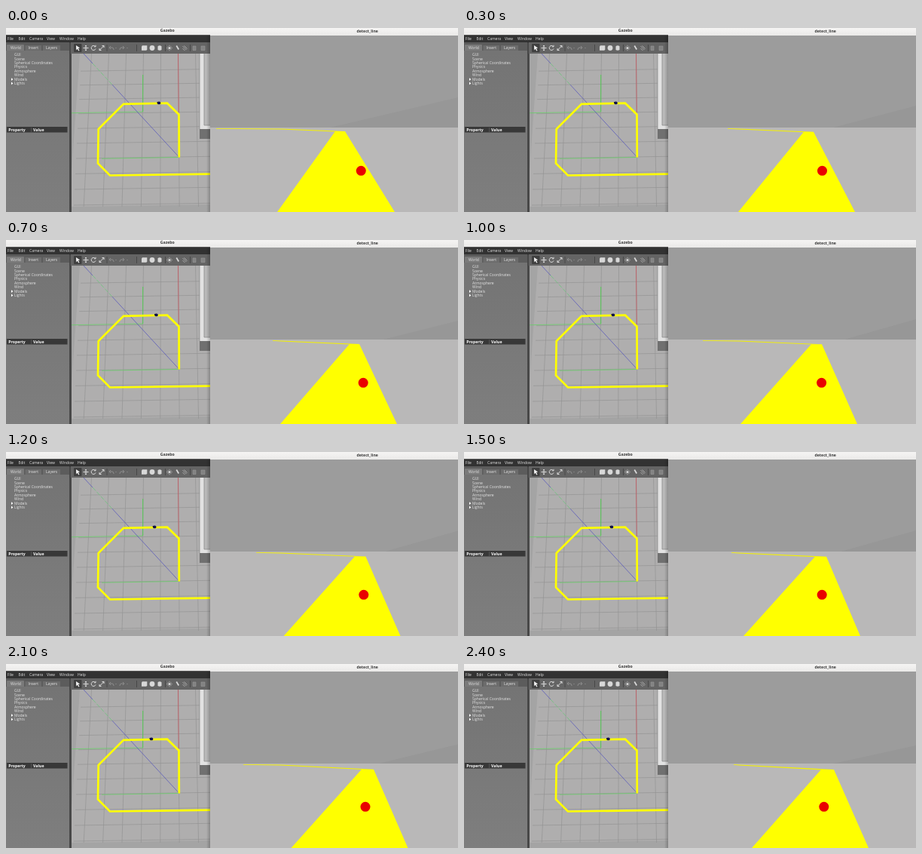
An HTML page that plays this animation: 600 by 244 pixels, repeating every 2500 ms.

```html
<!DOCTYPE html>
<html lang="en">
<head>
<meta charset="utf-8">
<title>Line follower</title>
<style>
  html, body { margin: 0; width: 100%; height: 100%; overflow: hidden; background: #777; }
  svg { display: block; width: 600px; height: 244px; }
  text { font-family: "Open Sans", "Noto Sans", sans-serif; font-size: 5px; fill: #e4e4e4; }
  .title { font-weight: 700; font-size: 5.2px; fill: #3a3a3a; text-anchor: middle; }
  .menu { font-size: 5.4px; fill: #f2f2f2; }
  .head { font-weight: 700; font-size: 5.2px; fill: #fff; }
  .stroke { fill: none; }
</style>
</head>
<body>
<svg viewBox="0 0 600 244">
  <defs>
    <linearGradient id="bar" x2="0" y2="1">
      <stop stop-color="#f5f4f3"/><stop offset="1" stop-color="#eae9e8"/>
    </linearGradient>
    <linearGradient id="side" x2="0" y2="1">
      <stop stop-color="#747474"/><stop offset="1" stop-color="#7e7e7e"/>
    </linearGradient>
    <linearGradient id="shadow">
      <stop stop-opacity="0"/><stop offset="1" stop-opacity=".22"/>
    </linearGradient>
    <clipPath id="view"><rect x="87" y="34" width="184" height="210"/></clipPath>
    <clipPath id="camera"><rect x="271" y="10" width="329" height="234"/></clipPath>
  </defs>

  <!-- simulator window -->
  <rect width="271" height="10" fill="url(#bar)"/>
  <text class="title" x="214.300" y="5.200">Gazebo</text>
  <rect y="9.400" width="271" height="235" fill="#484848"/>
  <rect y="9.400" width="271" height="10" fill="#323232"/>
  <g id="menu" class="menu"></g>
  <rect y="19" width="84" height="12" fill="#5c5c5c"/>
  <path d="M1 31V23q0-1 1-1H23q1 0 1 1V31z" fill="#7a7a7a"/>
  <path d="M25.500 30V23H47V30zM49 30V23H72V30z" fill="#6c6c6c"/>
  <g id="tabs"></g>
  <rect y="30" width="84" height="214" fill="url(#side)"/>
  <g id="tree"></g>
  <path d="M7 66.200l2.400 1.900-2.400 1.900zM7 71.500l2.400 1.900-2.400 1.900z" fill="#fff"/>
  <rect x="1" y="131" width="80.500" height="7.500" fill="#383838"/>
  <text class="head" x="3.200" y="136.500">Property</text>
  <text class="head" x="36" y="136.500">Value</text>
  <path d="M33.500 132V138" stroke="#666" stroke-width=".6"/>

  <!-- toolbar -->
  <rect x="86" y="19" width="185" height="15" fill="#646464"/>
  <rect x="90" y="21" width="10.500" height="11" rx="1" fill="#404040"/>
  <path d="M93 23l5.200 3.500-2.300.6 1.600 2.700-1.200.7-1.500-2.800-1.700 1.600z" fill="#eee"/>
  <g class="stroke" stroke="#ddd" stroke-width="1">
    <path d="M102.500 26.500h7M106 23v7M104.900 24.200l1.100-1.200 1.100 1.200M104.900 28.800l1.100 1.200 1.100-1.200"/>
    <path d="M118.500 24.500a3 3 0 1 0 .5 3M119 22.800v2h-2"/>
    <path d="M124 29.500l6-6M124 27v2.500h2.500M127.500 23.500h2.500v2.500"/>
  </g>
  <g class="stroke" stroke="#8c8c8c" stroke-width="1">
    <path d="M137 26h4q2 0 2 3M139 24l-2 2 2 2M157 26h-4q-2 0-2 3M155 24l2 2-2 2"/>
    <path d="M145 26l1 1 1-1M160 26l1 1 1-1" stroke-width=".6"/>
  </g>
  <path d="M134 22V31M173.500 22V31M211.500 22V31M244.500 22V31" stroke="#484848"/>
  <g fill="#d8d8d8">
    <path d="M180 24.500l1-1.300h6.300v5l-1 1.500H180z"/>
    <circle cx="194" cy="26.500" r="3.400"/>
    <path d="M201.500 24.200q2.500-1.800 5 0v4.800q-2.500 1.600-5 0z"/>
    <circle cx="217" cy="26.500" r="1.600"/>
    <path d="M225.500 24l1.500-1 3 5-1.500 1z"/>
  </g>
  <g class="stroke" stroke="#c8c8c8" stroke-width=".7">
    <path d="M217 22.800v1.500M217 28.700v1.500M213.300 26.500h1.500M219.200 26.500h1.500M214.500 24l1 1M218.500 28l1 1M219.500 24l-1 1M215.500 28l-1 1"/>
    <path d="M234.500 24l5 5M236.500 23.500l4 4M234.500 27l3 3"/>
  </g>
  <path d="M248 24h4v5.500h-4zM259 24h5v5.500h-5z" fill="#828282" stroke="#999" stroke-width=".6"/>

  <!-- world view -->
  <g clip-path="url(#view)">
    <rect x="87" y="34" width="184" height="210" fill="#a4a4a4"/>
    <path d="M98 34H271V234L87 237V190z" fill="#afaeae"/>
    <g id="grid" class="stroke" stroke="#949494" stroke-width=".7"></g>
    <path d="M257 34H271V134H257z" fill="#e2e2e2"/>
    <path d="M263 34H271V129H263z" fill="#b9b9b9"/>
    <path d="M257 34V134M263 34V129H271" class="stroke" stroke="#8c8c8c" stroke-width=".8"/>
    <rect x="257" y="134" width="14" height="13" fill="#707070"/>
    <g class="stroke" stroke-width=".8">
      <path d="M228.500 34L229.300 112" stroke="#c4555e"/>
      <path d="M87 112.700L182 111M127 173.200L229 171.500" stroke="#68d068"/>
      <path d="M181.700 62V111" stroke="#42d442"/>
      <path d="M103 34L115 47M141 75.200L229.500 171" stroke="#5c5cba"/>
      <path d="M115 47L141 75.200" stroke="#6cc47c" stroke-dasharray="6 2"/>
    </g>
    <path d="M272 193.600L138 195.500L122 179.500L122.700 134L156 100.800L214 99.700L229.500 114.700L229.800 171.500"
      class="stroke" stroke="#ff0" stroke-width="2.700"/>
    <g id="robot"><ellipse rx="2.300" ry="1.900" fill="#101050"/><path d="M-2.500 -.8h1.500" stroke="#111"/></g>
  </g>
  <rect x="266" y="10" width="5" height="234" fill="url(#shadow)"/>

  <!-- camera window -->
  <rect x="271" width="329" height="244" fill="#b9b8b8"/>
  <rect x="271" width="329" height="10" fill="url(#bar)"/>
  <text class="title" x="479.700" y="5.700">detect_line</text>
  <g clip-path="url(#camera)">
    <rect x="271" y="10" width="329" height="122" fill="#9c9c9c"/>
    <path id="shade" fill="#979797"/>
    <path id="far" fill="#f4f000"/>
    <path id="near" fill="#ff0"/>
    <circle id="dot" r="6.500" fill="#e90000"/>
  </g>
</svg>
<script>
  const $ = id => document.getElementById(id);
  const label = (x, y, s) => `<text x="${x}" y="${y}">${s}</text>`;
  const row = (id, y, items) => {
    $(id).innerHTML = items.map(([x, s]) => label(x, y, s)).join("");
  };

  row("menu", 15.9, [[2, "File"], [16.5, "Edit"], [31, "Camera"], [54, "View"], [71, "Window"], [95, "Help"]]);
  row("tabs", 27.6, [[6, "World"], [29.5, "Insert"], [53, "Layers"]]);
  $("tree").innerHTML = ["GUI", "Scene", "Spherical Coordinates", "Physics", "Atmosphere", "Wind", "Models", "Lights"]
    .map((s, i) => label(11, 37.1 + i * 5.45, s)).join("");

  // The grid passes through the axis origins at (229, 171) and (182, 111).
  let grid = "";
  for (let k = -5; k <= 1; k++) grid += `M${228.5 + k * 23} 34L${230.2 + k * 25.4} 237`;
  for (let k = -6; k <= 3; k++) {
    const y = 171 + k * 20.2 + k * k * 0.15;
    grid += `M${93 - k} ${y + 2}L271 ${y - 0.7}`;
  }
  $("grid").innerHTML = `<path d="${grid}"/>`;

  // time, robot x, apex left, apex right, apex y, base left, base right, dot x, far start, shade x, shade y
  const poses = [
    [0, 203, 437, 450, 137, 360, 516, 471.3, 279, 430, 92],
    [300, 201.5, 451, 464, 137.8, 364, 519, 475.5, 350, 490, 103],
    [700, 199.5, 456, 469, 138, 364, 519, 474.2, 354, 500, 107],
    [1000, 198, 461, 475, 138.2, 367, 522, 474.6, 317, 505, 105],
    [1500, 196, 466, 481, 138.8, 371, 526, 475.2, 355, 500, 104],
    [1800, 194.5, 470, 485, 139.3, 375, 530, 476.2, 272, 500, 105],
    [2400, 191.5, 474, 491, 140, 382, 537, 477.8, 358, 490, 108]
  ];

  function poseAt(t) {
    const i = Math.max(1, poses.findIndex(p => p[0] >= t));
    const a = poses[i - 1], b = poses[i];
    const u = (t - a[0]) / (b[0] - a[0]);
    return a.map((v, j) => v + (b[j] - v) * u);
  }

  function draw(now) {
    const t = Math.floor(now % 2500 / 100) * 100;
    const [, rx, al, ar, ay, bl, br, dx, fx, sx, sy] = poseAt(t);
    $("robot").setAttribute("transform", `translate(${rx} 99.4)`);
    $("near").setAttribute("d", `M${al} ${ay}H${ar}L${br} 244H${bl}z`);
    $("far").setAttribute("d", `M${fx} 133L365 133.5L${ar} ${ay}L${al} ${ay + 0.4}L365 134.6L${fx} 133.7z`);
    $("shade").setAttribute("d", `M${sx} 132L600 ${sy}V132z`);
    $("dot").setAttribute("cx", dx);
    $("dot").setAttribute("cy", 189.3);
  }

  const start = performance.now();
  function tick() {
    draw(performance.now() - start);
    requestAnimationFrame(tick);
  }
  tick();
</script>
</body>
</html>
```
